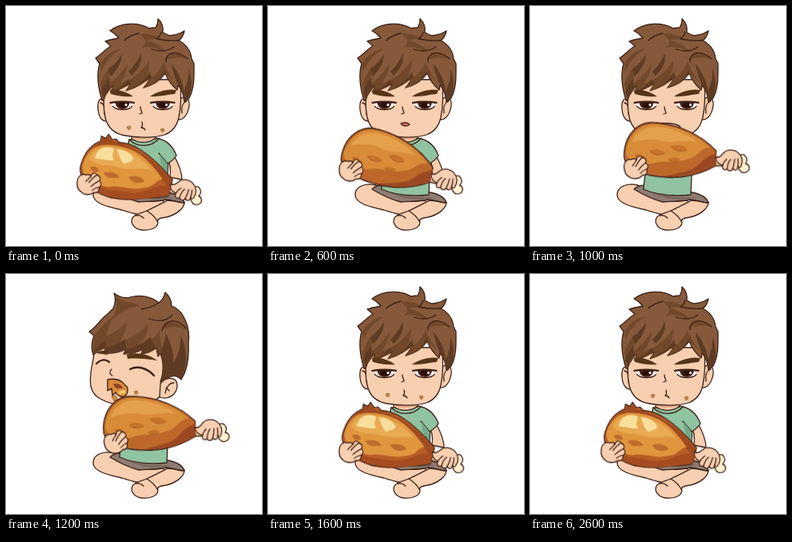
An HTML page that plays this animation: 320x300 px, repeating every 3100 ms.

```html
<!DOCTYPE html>
<html lang="en">
<head>
<meta charset="utf-8">
<title>Boy with a drumstick</title>
<style>
html, body { margin: 0; width: 100%; height: 100%; overflow: hidden; background: #fff; }
svg { display: block; width: 320px; height: 300px; }
.ink { stroke: #3d2118; stroke-width: 1.3; stroke-linejoin: round; stroke-linecap: round; }
.line { fill: none; }
.thick { stroke-width: 2.4; }
.skin { fill: #f8cfb0; }
.skin-shade { fill: #e9ad8b; }
.shirt { fill: #90c3a0; }
.shirt-shade { fill: #74a787; }
.hair { fill: #85593a; }
.hair-mid { fill: #714829; }
.hair-dark { fill: #5e3b22; }
.brow { fill: #573519; }
.crumb { fill: #c98745; stroke: #86512b; stroke-width: .6; }

/* Every pose is held, then switched hard. */
.drum, .grip, .whole, .bitten, .front, .side, .chew, .open, .bite, .sleeve, .crumbs {
  animation: 3100ms step-end infinite;
}
.drum { animation-name: drum; }
.grip { animation-name: grip; }
.whole { animation-name: whole; }
.bitten { animation-name: bitten; }
.front { animation-name: front; }
.side { animation-name: side; }
.chew { animation-name: chew; }
.open { animation-name: open; }
.bite { animation-name: bite; }
.sleeve { animation-name: sleeve; }
.crumbs { animation-name: crumbs; }

@keyframes drum {
  0% { transform: translate(95px, 194px) rotate(17deg); }
  19.354% { transform: translate(93px, 183px) rotate(16deg); }
  25.806% { transform: translate(105px, 182px) rotate(11deg); }
  32.258% { transform: translate(118px, 182px) rotate(6deg); }
  38.709% { transform: translate(122px, 191px) rotate(3deg); }
  45.161% { transform: translate(126px, 200px) rotate(0deg); }
  51.612%, 100% { transform: translate(95px, 194px) rotate(17deg); }
}
@keyframes grip {
  0% { transform: none; }
  19.354% { transform: translate(0, -6px); }
  45.161%, 100% { transform: none; }
}
@keyframes whole { 0% { visibility: hidden; } 3.225% { visibility: visible; } 45.161%, 100% { visibility: hidden; } }
@keyframes bitten { 0% { visibility: visible; } 3.225% { visibility: hidden; } 45.161%, 100% { visibility: visible; } }
@keyframes front { 0% { visibility: visible; } 38.709% { visibility: hidden; } 51.612%, 100% { visibility: visible; } }
@keyframes side {
  0% { visibility: hidden; transform: none; }
  38.709% { visibility: visible; transform: translate(3px, 0); }
  45.161% { visibility: visible; transform: none; }
  51.612%, 100% { visibility: hidden; transform: none; }
}
@keyframes chew { 0% { visibility: visible; } 19.354% { visibility: hidden; } 51.612%, 100% { visibility: visible; } }
@keyframes open { 0% { visibility: hidden; } 19.354% { visibility: visible; } 32.258%, 100% { visibility: hidden; } }
@keyframes bite { 0% { visibility: hidden; } 32.258% { visibility: visible; } 38.709%, 100% { visibility: hidden; } }
@keyframes sleeve { 0% { visibility: visible; } 32.258% { visibility: hidden; } 51.612%, 100% { visibility: visible; } }
@keyframes crumbs {
  0% { visibility: visible; transform: none; }
  3.225% { visibility: hidden; transform: none; }
  51.612%, 64.516%, 77.419% { visibility: visible; transform: translate(-4px, -1px); }
  58.064%, 70.967%, 83.87%, 100% { visibility: visible; transform: none; }
}
</style>
</head>
<body>
<svg viewBox="0 0 320 300">
  <defs>
    <g id="eye">
      <path fill="#fff" d="M-14 -4Q0 -6 14 -4Q12 5 0 5Q-11 5 -14 -4Z"/>
      <path fill="#4f2012" d="M-9 -5H9Q9 4 0 4.600Q-9 4 -9 -5Z"/>
      <ellipse cy="-.8" rx="5" ry="3.400" fill="#29100a"/>
      <circle cx="4.500" cy="-1" r="1.500" fill="#fff"/>
      <path class="ink line thick" d="M-15 -3.600Q0 -5.800 14.500 -3.600"/>
      <path class="ink line" d="M-12 1Q-8 5 0 5Q9 5 12 1"/>
    </g>
  </defs>

  <g id="legs">
    <path class="skin ink" d="M135 224C120 220 108 227 109 237C110 247 127 251 145 255C157 259 167 262 182 262L200 245Z"/>
    <path class="skin ink" d="M223 245C223 253 213 261 200 264C191 265 188 267 190 271C189 278 179 281 170 280C160 279 155 271 158 265C160 260 169 259 176 256C187 251 194 247 202 243Z"/>
    <path class="ink line" d="M176 256C181 259 186 263 189 269M162 262C166 261 170 263 172 265"/>
    <path class="ink" fill="#8f7c72" d="M130 229C135 224 143 223 151 226C171 227 188 229 203 233C212 235 221 239 223 246C215 246 208 242 200 242C187 245 178 244 166 245C155 242 143 237 130 229Z"/>
    <path fill="#756359" d="M150 232C167 239 185 240 210 239C190 243 171 243 150 232Z"/>
  </g>

  <g id="torso">
    <path class="shirt ink" d="M154 167C149 187 143 207 142 229C160 237 181 238 201 236L203 190L190 166Z"/>
    <g class="sleeve">
      <path class="skin ink" d="M201 190C206 197 206 206 205 214L220 217C220 206 215 196 210 187Z"/>
      <path class="shirt ink" d="M187 165C201 167 209 176 213 187C210 192 207 194 202 197L191 184"/>
      <path class="shirt-shade" d="M192 185L201 196L202 211C195 202 192 195 192 185Z"/>
    </g>
    <path class="skin ink" d="M158 156L157 166C166 172 179 172 187 165V155Z"/>
    <path class="skin-shade" d="M159 160H186V165Q172 169 159 166Z"/>
    <path class="ink line" d="M154 167C164 177 181 177 191 166"/>
  </g>

  <g class="front">
    <path class="skin ink" d="M126 119C118 112 114 118 115 129C116 140 121 146 128 143ZM216 118C224 110 230 115 229 125C227 137 221 143 214 142Z"/>
    <path class="ink line" d="M118 121C123 122 124 128 123 135M226 119C220 121 219 128 220 134"/>
    <path class="skin ink" d="M125 92C122 108 121 125 124 139C127 153 137 160 149 162C164 165 186 165 198 161C209 157 214 149 216 139C219 125 219 108 218 92Z"/>
    <path class="hair ink" d="M120 118C115 102 113 86 117 72L112 65C119 61 124 54 131 50L124 44C130 42 136 41 141 40C138 36 134 33 130 31C144 20 166 20 179 28C183 27 185 27 187 27C189 24 190 20 190 16C195 20 197 27 196 33C200 35 203 37 206 37C212 36 218 35 223 31C222 36 219 41 216 43C225 48 231 56 232 66L235 72C235 86 236 102 229 115L223 120C222 110 220 104 215 99L214 105C207 99 202 92 199 84C194 92 184 99 172 102C177 97 180 92 181 88C172 97 160 103 150 106L156 97C148 101 140 106 131 108L134 99C128 104 125 108 122 118Z"/>
    <path class="hair-mid" d="M118 98C122 88 126 80 132 74C129 84 129 90 130 96C138 90 146 82 152 72C151 82 147 90 142 97C156 93 170 83 179 68C179 78 177 86 172 94C184 90 192 82 197 70C202 82 208 92 214 98L199 84C194 92 184 99 172 102L181 88C172 97 160 103 150 106L156 97C148 101 140 106 131 108L134 99L121 113ZM118 72C124 61 134 55 145 53C132 61 126 67 119 82ZM166 35C178 33 188 37 194 43C187 41 181 41 175 43C188 46 196 51 200 58C190 52 178 50 169 52C178 46 174 40 166 35ZM197 68C203 58 214 56 226 66C216 63 206 65 197 68Z"/>
    <path class="hair-dark" d="M119 108C121 101 125 94 130 90C128 98 129 101 134 99L131 107C138 105 146 100 152 92L156 97L151 105C161 102 172 95 180 82L181 88L174 101C184 98 193 92 198 80L199 84C203 92 208 99 214 104L215 99C211 90 208 81 207 72C214 82 222 94 222 107C226 98 229 90 228 78C233 92 233 104 229 114L223 119C222 108 219 102 215 99L214 105C207 99 202 92 199 84C194 92 184 99 172 102L181 88C172 97 160 103 150 106L156 97C148 101 140 106 131 108L134 99L122 116ZM128 79C135 74 141 67 145 60C145 70 139 80 131 88ZM153 82C161 74 166 67 168 59C171 69 166 78 157 87Z"/>
    <path class="ink line" d="M200 70C199 59 212 53 227 66M182 54C192 57 202 57 210 51M194 33C193 37 191 39 188 41C197 43 205 44 216 43M166 34C158 36 152 39 148 43"/>
    <path class="brow" d="M130 105C139 103 150 107 159 113C149 114 138 112 131 110ZM180 113C189 107 201 103 213 105L211 110C200 111 190 114 180 113Z"/>
    <use href="#eye" x="145.500" y="124.500"/>
    <use href="#eye" x="196" y="124.500"/>
    <path class="ink line" d="M168 126C168 130 170 132 170 134L167 135"/>
    <path class="chew ink line" d="M170 145C171 148 171 150 169 152C171 152 173 153 174 155"/>
    <path class="crumbs crumb" d="M151 151L155 150L156 153L153 155ZM193 154L197 153L198 156L195 158Z"/>
    <path class="open ink" fill="#cf6c61" d="M166 147C169 145 174 145 177 148C175 151 169 151 166 147Z"/>
    <path class="bite ink line" d="M152 151C158 145 181 145 188 151"/>
  </g>

  <g class="side">
    <path class="skin ink" d="M107 92C108 104 104 112 103 124C101 140 104 149 113 155C123 161 139 165 155 165C171 165 183 161 190 152C198 140 204 112 202 84Z"/>
    <path class="skin ink" d="M190 137C198 127 211 129 211 139C211 150 201 158 189 154Z"/>
    <path class="ink line" d="M207 136C201 136 197 142 196 149M201 146L197 142"/>
    <path class="hair ink" d="M106 101C103 92 104 84 107 77L101 72C110 67 115 56 124 50L131 43C134 37 134 30 132 24C139 29 145 31 152 29C166 25 180 29 188 36C192 33 195 28 196 23C202 28 204 34 204 40C210 42 214 46 217 50C224 61 227 72 225 86C226 104 224 120 216 132C211 126 204 127 199 130L190 135C194 124 195 112 190 99L187 103C186 98 185 95 185 92C180 97 173 99 166 100L168 94C160 99 152 100 144 100L147 94C137 99 127 100 119 98L122 92C115 94 110 98 106 101Z"/>
    <path class="hair-mid" d="M107 77C115 69 120 60 131 53C126 63 124 70 122 78C132 74 142 67 148 59C148 69 144 77 139 85C153 81 166 73 174 63C174 74 170 82 163 89C175 86 184 80 189 70C190 84 192 97 195 108L190 99L187 103L185 92C180 97 173 99 166 100L168 94C160 99 152 100 144 100L147 94C137 99 127 100 119 98L122 92L106 100ZM132 25C140 36 154 34 164 40C150 42 140 47 129 58C136 46 137 36 132 25ZM192 69C199 57 213 58 222 70C212 64 202 66 192 69Z"/>
    <path class="hair-dark" d="M106 98C111 91 115 86 121 83L122 92C129 92 139 87 146 81L147 94C157 93 168 87 177 79L185 92L190 99C193 90 196 82 197 74C203 86 207 98 206 111C213 101 216 89 215 77C223 89 225 114 216 131C211 126 204 127 199 130L191 134C195 122 195 111 190 99L187 103L185 92C180 97 173 99 166 100L168 94C160 99 152 100 144 100L147 94C137 99 127 100 119 98L122 92Z"/>
    <path class="ink line" d="M188 36C181 41 174 43 166 44M192 71C195 57 211 54 222 68M176 56C188 60 198 59 205 51"/>
    <path class="brow" d="M110 99C115 95 121 95 126 97L124 101ZM148 101C161 97 175 100 186 108C172 106 160 105 149 106Z"/>
    <path class="ink line thick" d="M110 112C115 107 121 106 126 110M152 119C162 114 174 118 182 127"/>
    <path class="ink line" d="M129 119C126 122 126 125 130 127"/>
    <path class="ink" fill="#d58a39" d="M124 132C132 130 141 132 145 138C151 141 150 150 145 153C139 155 136 151 134 148L130 152L129 143L124 146Z"/>
    <path fill="#934425" d="M131 138C136 135 142 139 143 143L135 143Z"/>
    <path fill="#f2c66c" d="M137 148C141 144 145 144 147 147C145 151 141 152 137 148Z"/>
    <path class="crumb" d="M157 147L161 146L162 149L159 151ZM129 153L134 152L137 157L132 159Z"/>
  </g>

  <g class="drum">
    <path class="ink" fill="#fff0cf" d="M110 -5L141 -4C142 -11 148 -14 151 -10C154 -8 154 -4 152 -1C158 0 159 6 155 9C150 13 145 9 143 4L110 6Z"/>
    <path fill="#e0bd87" d="M112 2L144 1L147 6L143 3L112 5Z"/>

    <g class="whole">
      <path class="ink" fill="#bd672a" d="M0 4C-2 -20 12 -40 35 -40C65 -41 95 -30 114 -13L115 6C104 14 92 20 75 24C50 29 20 27 8 18C3 14 0 10 0 4Z"/>
      <path fill="#d88c38" d="M2 1C2 -20 15 -38 36 -38C65 -39 90 -29 106 -16C93 -15 94 -4 80 1C64 9 48 5 37 11C22 16 5 13 2 1Z"/>
      <path fill="#e4a04a" d="M8 -12C13 -28 25 -36 42 -35C63 -35 79 -28 90 -21C73 -24 61 -16 47 -18C31 -21 20 -16 8 -12Z"/>
      <path fill="#9b4822" d="M115 -11L115 6C99 16 77 25 51 26C77 17 88 16 97 3C102 -4 108 -6 115 -11Z"/>
      <path fill="#c77229" d="M31 -4C38 -9 47 -7 51 -3C45 -1 37 2 31 -4ZM57 -13C65 -17 75 -15 78 -10C70 -6 61 -7 57 -13ZM13 3C18 -1 24 1 25 5C20 8 16 8 13 3ZM55 4C61 0 68 0 70 3C64 7 59 8 55 4Z"/>
      <path fill="none" stroke="#a55b27" stroke-width=".8" d="M32 -3C38 1 45 0 50 -3M58 -12C64 -7 71 -6 77 -10M57 5C62 7 66 6 70 3"/>
    </g>

    <g class="bitten">
      <path class="ink" fill="#b75d27" d="M0 4C0 -12 6 -24 15 -31L14 -37L20 -36L22 -42L28 -37L33 -39L37 -36C46 -38 56 -38 66 -35C84 -30 100 -21 115 -11L116 10C107 15 98 18 89 21C75 28 64 32 48 33C25 34 0 24 0 4Z"/>
      <path fill="#a04a20" d="M9 -23L16 -31L16 -36L21 -35L23 -39L28 -35L37 -35C62 -37 94 -24 114 -10V0C96 -10 83 -18 66 -24C47 -29 23 -26 9 -23Z"/>
      <path fill="#e0963d" d="M2 4C2 -11 8 -22 19 -27C35 -33 56 -34 70 -28C85 -22 94 -15 103 -8C94 -4 96 5 84 9C70 18 54 14 42 21C22 25 5 19 2 4Z"/>
      <path fill="#e8aa52" d="M7 -6C10 -21 22 -27 37 -28C56 -30 73 -25 87 -15C71 -14 61 -6 47 -6C31 -6 23 2 7 -6Z"/>
      <path fill="#f7df9b" d="M14 -8C13 -20 20 -28 33 -27C36 -23 31 -19 38 -13C30 -9 21 -10 14 -8ZM37 -27C47 -30 57 -27 61 -21C58 -15 54 -16 52 -12C45 -14 42 -22 37 -27Z"/>
      <path fill="#a54d20" d="M115 -4L116 9C94 20 73 31 46 32C33 33 20 30 12 24C34 28 53 21 70 20C89 16 91 3 115 -4Z"/>
      <path fill="#bd6d2b" d="M30 6C39 0 47 2 51 6C43 9 36 13 30 6ZM61 2C69 -4 79 -3 82 1C75 8 67 8 61 2ZM12 4C18 0 22 2 24 6C19 10 14 9 12 4Z"/>
    </g>

    <g class="grip">
      <path class="skin ink" d="M2 27C0 20 4 14 10 15C12 13 15 13 16 15C16 10 20 8 23 11C27 11 29 14 28 17C32 19 32 23 30 25C32 29 30 33 26 33C22 38 15 40 10 37C6 36 3 32 2 27Z"/>
      <path class="ink line" d="M16 15C15 18 13 20 12 23M23 11C20 14 18 18 16 23M28 17C25 20 22 23 20 27M30 25C27 26 25 28 23 31"/>
    </g>
    <path class="skin ink" d="M114 -5C119 -4 121 -8 124 -12C128 -17 138 -17 142 -13C147 -10 149 -3 147 2C147 5 144 6 143 3C144 8 140 10 137 7C136 11 131 11 130 8C127 11 123 9 124 4C120 4 115 1 114 -5Z"/>
    <path class="ink line" d="M124 4C125 0 126 -2 128 -4M130 8C130 2 131 -2 133 -4M137 7C138 2 138 -1 138 -5M143 3C143 0 143 -3 142 -6"/>
  </g>
</svg>
</body>
</html>
```
